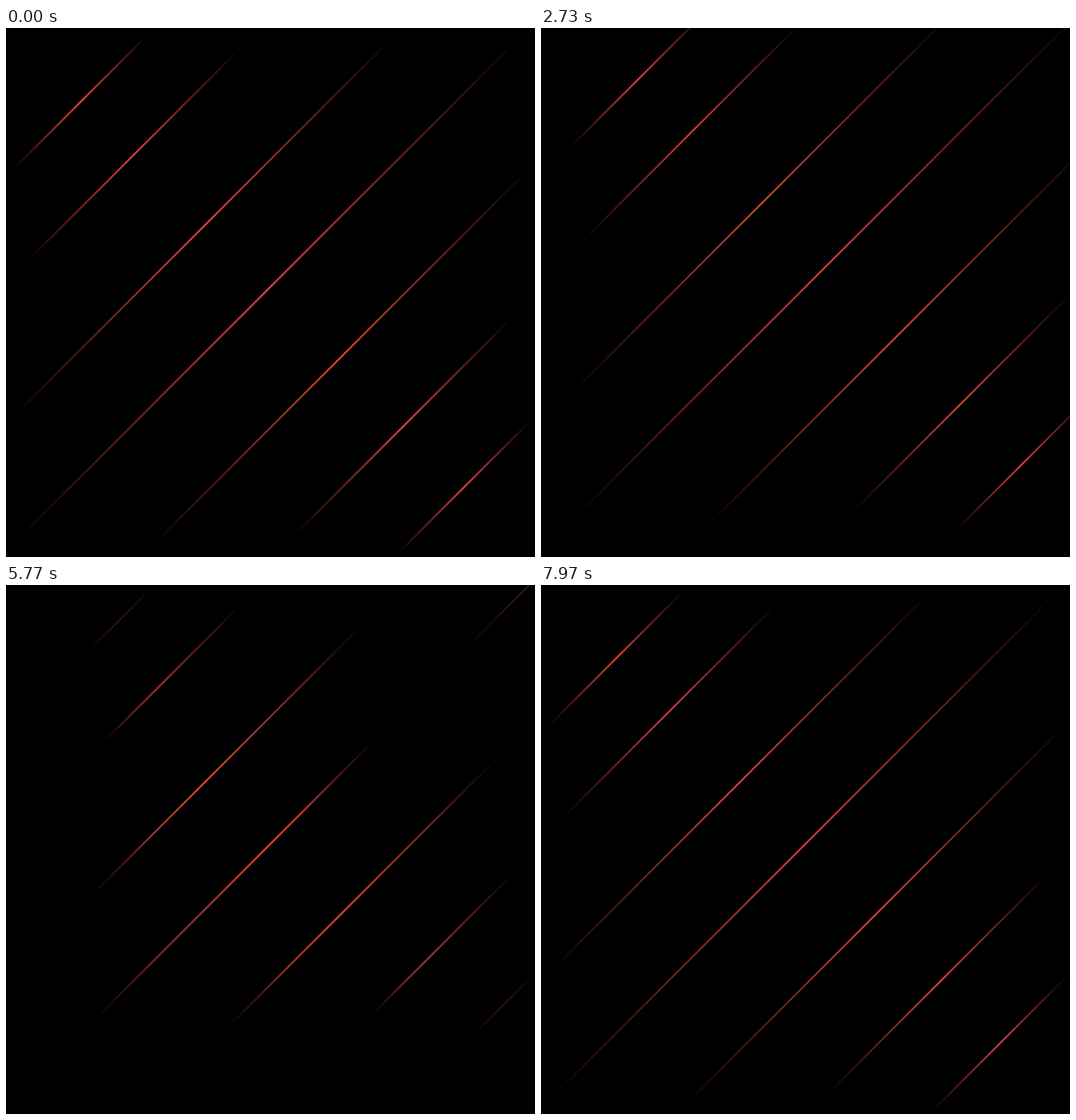
Animation of 748 by 748 pixels, one loop 8000 ms. Source, as an HTML page with a canvas:

```html
<!DOCTYPE html>
<html lang="en">
<head>
<meta charset="utf-8">
<title>Red diagonals</title>
<style>
  html, body { margin: 0; width: 100%; height: 100%; overflow: hidden; background: #000; }
  canvas { display: block; width: 748px; height: 748px; }
</style>
</head>
<body>
<canvas id="stage" width="748" height="748"></canvas>
<script>
const ctx = document.getElementById('stage').getContext('2d');
const SIZE = 748, CYCLE = 4000, STOPS = 64;

// Each 45° line: lower-left end x, y, horizontal run, peak colour
const LINES = [
  [9, 201, 193, '222,66,58'],
  [27, 333, 307, '216,58,62'],
  [9, 551, 543, '214,66,58'],
  [11, 729, 719, '218,62,60'],
  [201, 738, 542, '214,66,52'],
  [406, 719, 312, '214,66,58'],
  [553, 744, 191, '212,60,68']
];

const clamp = v => Math.max(0, Math.min(1, v));

function drawLine([x, y, run, rgb], shift, mask) {
  const x0 = x + shift, y0 = y - shift;
  if (x0 > SIZE || y0 < 0) return;
  const grad = ctx.createLinearGradient(x0, y0, x0 + run, y0 - run);
  for (let i = 0; i <= STOPS; i++) {
    const k = i / STOPS;
    const alpha = (1 - Math.abs(2 * k - 1)) * mask(k * run);
    grad.addColorStop(k, `rgba(${rgb},${alpha.toFixed(4)})`);
  }
  ctx.strokeStyle = grad;
  ctx.beginPath();
  ctx.moveTo(x0, y0);
  ctx.lineTo(x0 + run, y0 - run);
  ctx.stroke();
}

function render(t) {
  ctx.fillStyle = '#000';
  ctx.fillRect(0, 0, SIZE, SIZE);
  ctx.lineWidth = 2.5;

  // Incoming lines glide down-left and settle exponentially
  const slide = 32 * Math.exp(-0.0031 * (t - 2730));
  // A soft gap runs down each line, followed by a wipe ahead of the new lines
  const dt = Math.min(t - 1570, 1100);
  const gap = t < 1000 ? 1000 : 250 - 0.95 * dt + 0.0004 * dt * dt;
  const wipe = slide * 0.85 - 20;

  const leaving = d => clamp((Math.abs(d - gap) - 35) / 85) * clamp((wipe - d) / 100);
  const whole = () => 1;

  for (const line of LINES) {
    if (t < 1000) {
      drawLine(line, 0, whole);
      continue;
    }
    if (wipe > 0) drawLine(line, 0, leaving);
    drawLine(line, slide, whole);
  }
}

const start = performance.now();
function tick() {
  render((performance.now() - start) % CYCLE);
  requestAnimationFrame(tick);
}
tick();
</script>
</body>
</html>
```
